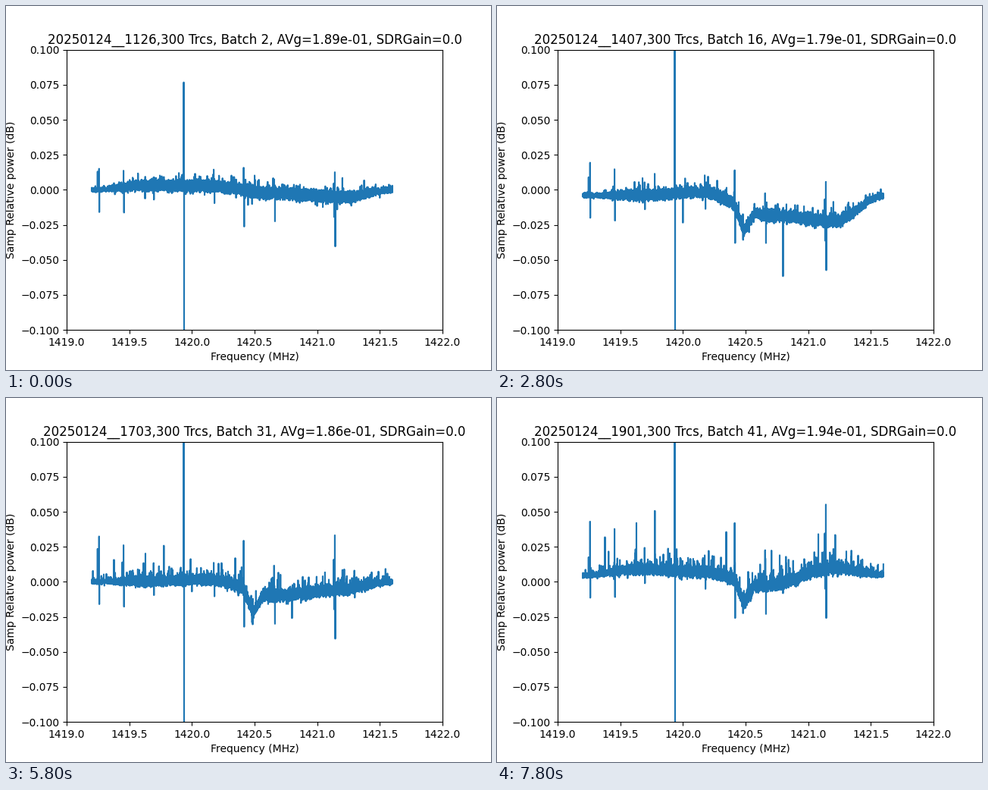
These frames come from a looping animation (640x480 px, 8000 ms). A matplotlib script:

```python
import numpy as np
import matplotlib.pyplot as plt
from matplotlib.animation import FuncAnimation

FRAMES, INTERVAL = 40, 200
N = 8192
FREQ = np.linspace(0.2, 2.6, N)          # MHz above 1419

# Passband levels (thousandths of a dB) at six anchor frequencies,
# given at a few steps and blended in between
ANCHORS = np.array([.22, .65, 1.15, 1.65, 2.2, 2.6])
LEVELS = {
    0: (0, 3, 2.5, -2.5, -5.5, 0),
    9: (8, 29.5, 34, 26, 28, 10.5),
    14: (-4, -4, -1.5, -18, -22.5, -4.5),
    21: (-4.5, -8, -4.5, -16, -21.5, -5),
    25: (-4, -7, -2, -14, -19.5, -4.5),
    32: (3, 6, 4.5, -7, 5, 3.5),
    39: (4.5, 9, 7, -3, 9.5, 5),
}


# How the strength of an interference line runs over the loop
def steady(step):
    return 1


def grow(step):
    return 1 + step / 25


def fade(step):
    return step / 9 * np.exp(1 - step / 9)


def late(step):
    return np.clip((step - 26) / 5, 0.15, 1)


def flash(step):
    return 0.13 + np.exp(-((step - 32) / 2) ** 2)


def carrier(step):
    return 1 + 1.2 * abs(np.sin(np.pi * step / 21))


# Frequency, height above or below the passband, strength
LINES = [
    (.247, 100, flash), (.259, 15, grow), (.261, -16, steady),
    (.378, 26, late), (.454, 12, grow), (.458, -18, steady),
    (.629, 33, late), (.694, 6, grow), (.697, -10, steady),
    (.776, 42, late), (.935, 74, carrier), (.9375, -150, steady),
    (1.0, -24, fade), (1.174, 12, steady), (1.18, -12, steady),
    (1.346, 32, late), (1.413, 16, grow), (1.417, -26, steady),
    (1.48, -9, steady), (1.656, 10, grow), (1.663, -20, steady),
    (1.707, 25, late), (1.799, -48, fade), (2.132, 10, grow),
    (2.135, -14, steady), (2.141, 18, grow), (2.144, -35, steady),
    (2.201, 14, steady), (2.216, 24, late),
]


def passband(step):
    rows = zip(*LEVELS.values())
    level = np.array([np.interp(step, list(LEVELS), row) for row in rows])
    i = np.clip(np.searchsorted(ANCHORS, FREQ) - 1, 0, len(ANCHORS) - 2)
    u = np.clip((FREQ - ANCHORS[i]) / (ANCHORS[i + 1] - ANCHORS[i]), 0, 1)
    curve = level[i] + (level[i + 1] - level[i]) * u * u * (3 - 2 * u)
    notch = np.clip(1 - abs(FREQ - 1.49) / 0.08, 0, 1)
    return curve - 15 * min(1, step / 9) * notch


def spectrum(step, base):
    rng = np.random.default_rng(1000 + step)
    spread = np.interp(FREQ, [.2, .3, .6, 2.2, 2.6], [.45, .4, 1, 1.1, .45])
    y = base + 1.75 * spread * rng.normal(size=N).clip(-2.5, 2.5)

    for count, sign, scale in ((450, 1, 1.3 + 2.2 * late(step)), (250, -1, 1)):
        spots = rng.integers(0, N, count)
        size = 2.5 + rng.exponential(scale, count)
        y[spots] = base[spots] + sign * spread[spots] * size

    for freq, height, strength in LINES:
        i = int(round((freq - 0.2) / 2.4 * (N - 1)))
        peak = height * strength(step)
        pick = max if height > 0 else min
        for j, share in ((i, 1), (i - 1, .35), (i + 1, .35)):
            y[j] = pick(y[j], base[j] + share * peak)
    return y / 1000


def heading(step, base):
    clock = int(686.35 + 11.47 * step + 0.0053 * step ** 2)
    average = 0.1895 + base.mean() / 1000
    return (f"20250124__{clock // 60:02d}{clock % 60:02d},300 Trcs, "
            f"Batch {step + 2}, AVg={average:.2e}, SDRGain=0.0")


fig, ax = plt.subplots(figsize=(6.4, 4.8), dpi=100)
trace, = ax.plot(FREQ + 1419, np.zeros(N), color="#1f77b4", lw=1.5)
ax.set(xlim=(1419, 1422), ylim=(-0.1, 0.1),
       xlabel="Frequency (MHz)", ylabel="Samp Relative power (dB)")
title = ax.set_title("")


def update(step):
    base = passband(step)
    trace.set_ydata(spectrum(step, base))
    title.set_text(heading(step, base))
    return trace, title


anim = FuncAnimation(fig, update, frames=FRAMES, interval=INTERVAL,
                     repeat=True, repeat_delay=0)
plt.show()
```
